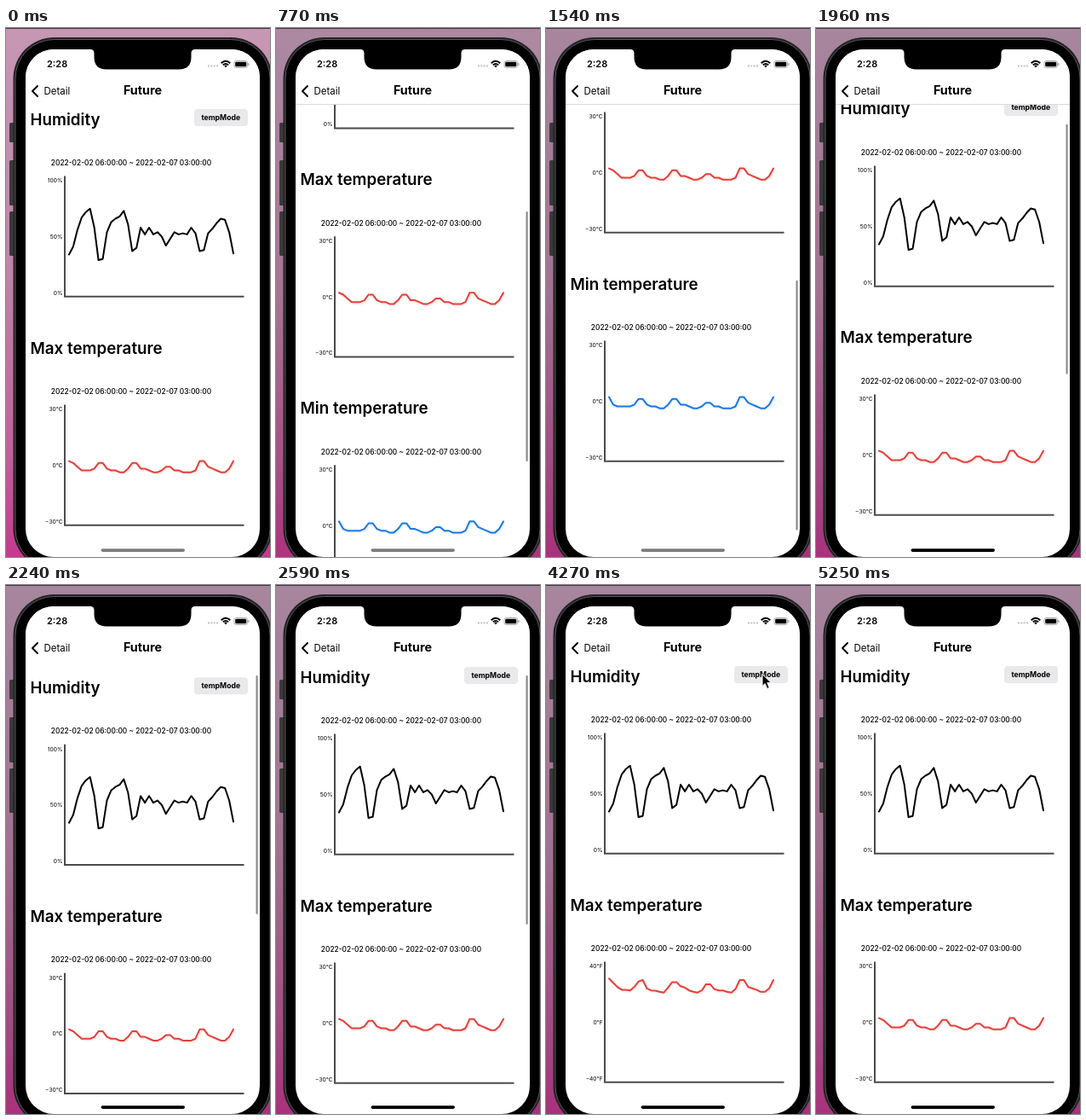
These frames come from a looping animation (310x620 px, 5.95 s). An HTML page:

```html
<!DOCTYPE html>
<html lang="en">
<head>
<meta charset="utf-8">
<title>Forecast charts</title>
<style>
  html, body { margin: 0; width: 100%; height: 100%; overflow: hidden; }
  svg { display: block; width: 310px; height: 620px; font-family: Inter, "Open Sans", sans-serif; }
  .title { font-size: 18.8px; font-weight: 600; }
  .dates { font-size: 8.4px; font-weight: 500; text-anchor: middle; }
  .label { font-size: 6.7px; text-anchor: end; }
  .axis { fill: none; stroke: #4b4b4d; stroke-width: 2; }
  .line { fill: none; stroke-width: 2; stroke-linejoin: round; stroke-linecap: round; }
</style>
</head>
<body>
<svg viewBox="0 0 310 620">
  <defs>
    <linearGradient id="dusk" x2="0" y2="1">
      <stop stop-color="#a7869e"/><stop offset=".5" stop-color="#a0728f"/>
      <stop offset=".85" stop-color="#a04a80"/><stop offset="1" stop-color="#a8327c"/>
    </linearGradient>
    <linearGradient id="dawn" x2="0" y2="1">
      <stop stop-color="#c797b4"/><stop offset=".45" stop-color="#bd86a6"/>
      <stop offset=".8" stop-color="#c0629a"/><stop offset="1" stop-color="#c43a8e"/>
    </linearGradient>
    <clipPath id="screen"><rect x="23" y="25" width="275" height="595" rx="33"/></clipPath>
  </defs>

  <rect width="310" height="620" fill="url(#dusk)"/>
  <rect id="glow" width="310" height="620" fill="url(#dawn)"/>
  <rect width="310" height="1" fill="#41363f"/>

  <g fill="#3a383b">
    <rect x="4" y="111" width="6" height="23" rx="1.5"/>
    <rect x="4" y="155" width="6" height="53" rx="1.5"/>
    <rect x="4" y="215" width="6" height="52" rx="1.5"/>
  </g>
  <rect x="8.5" y="11" width="304" height="624" rx="48" fill="#232325"/>
  <rect x="11" y="13.5" width="299" height="619" rx="45.5" stroke="#59595b"/>

  <g clip-path="url(#screen)">
    <rect x="23" y="25" width="275" height="595" fill="#fff"/>
    <g id="content"></g>
    <rect id="thumb" x="293.5" width="2.2" rx="1.1" fill="#8c8c8c"/>
    <rect x="23" y="25" width="275" height="64" fill="#fff"/>
    <rect id="hairline" x="23" y="89" width="275" height="1" fill="#d9d9d9"/>
    <path d="M37 68L31 74L37 80" fill="none" stroke="#000" stroke-width="1.9" stroke-linecap="round" stroke-linejoin="round"/>
    <text x="44.5" y="78" font-size="11.5">Detail</text>
    <text x="160.5" y="78" font-size="14.4" font-weight="700" text-anchor="middle">Future</text>
    <text x="48" y="46.3" font-size="11" font-weight="600">2:28</text>
    <path d="M237 44.5h12" stroke="#c3c3c5" stroke-width="2" stroke-dasharray="2 1.3"/>
    <g fill="none" stroke="#000" stroke-width="1.9">
      <path d="M252.7 41.3Q258 36.2 263.3 41.3M254.8 43.4Q258 40.4 261.2 43.4"/>
      <path d="M256.2 44.3Q258 42.9 259.8 44.3L258 46.4Z" fill="#000" stroke="none"/>
    </g>
    <rect x="268" y="38.5" width="15.5" height="8" rx="2.2" fill="none" stroke="#9a9a9a" stroke-width=".8"/>
    <rect x="269.2" y="39.7" width="13.1" height="5.6" rx="1.2"/>
    <rect x="284.3" y="41" width="1.2" height="3" rx=".6" fill="#9a9a9a"/>
    <rect id="home" x="111.5" y="610.3" width="98.5" height="3.6" rx="1.8"/>
  </g>
  <path d="M99 24H222V25Q217.500 25 217.500 29.500V34Q217.500 48.500 203 48.500H118Q103.500 48.500 103.500 34V29.500Q103.500 25 99 25Z"/>
  <path id="cursor" d="M254 104.500V118.500L257.200 115.500L259.700 121.500L262.300 120.400L259.800 114.600H264.300Z" stroke="#fff"/>
</svg>

<script>
const LOOP = 5950, STEP = 70, SCROLL_END = 343;
const $ = id => document.getElementById(id);

const humidity = [34,41,56,67,72,75,58,29,30,54,63,66,68,73,61,37,40,58,52,58,
  52,54,50,42,48,54,52,53,52,58,53,37,38,53,57,62,66,65,54,35];
const maxC = [2,1,-1,-3,-3,-3,-2,1,1,-2,-3,-3,-4,-4,-2,1,1,-2,-2,-3,
  -4,-4,-3,-1,-1,-3,-3,-4,-4,-4,-3,2,2,-1,-2,-3,-4,-4,-2,2];
const maxF = [31,28,25,23,23,22.5,25,29,30,24,22.5,22.3,21.5,21,24.5,28.5,28.5,25.5,24.5,22.5,
  21.5,21,22.5,27,27,23.5,22.5,22.5,21.5,21,23.5,30,30,25,24,23,21.5,21.5,24,30];
const minC = [2, -2, -3, ...maxC.slice(3)];

// Vertical positions are relative to the centre of a section title.
const plot = (values, zero, scale) =>
  values.map((v, i) => `${(74 + i * 193 / 39).toFixed(1)},${(zero - v * scale).toFixed(1)}`).join(' ');
const celsius = values => plot(values, 137, 2.18);
const fahrenheit = values => plot(values, 137, 1.635);

function section(index, title, labels, points, color, shadow) {
  const ticks = labels.map((s, i) =>
    `<text class="label" x="66.6" y="${74.4 + 65.6 * i}">${s}</text>`).join('');
  return `<g transform="translate(0 ${107 + 268 * index})">
    <text class="title" x="28.5" y="6.5">${title}</text>
    <text class="dates" x="147" y="54">2022-02-02 06:00:00 ~ 2022-02-07 03:00:00</text>
    ${ticks}
    <path class="axis" d="M69 66.5V207.8H279.500"/>
    <polyline class="line" id="line${index}" points="${points}" stroke="${color}"
      style="filter: drop-shadow(1.5px 1.5px 1px ${shadow})"/>
  </g>`;
}

const degrees = ['30°C', '0°C', '−30°C'];
$('content').innerHTML =
  section(0, 'Humidity', ['100%', '50%', '0%'], plot(humidity, 203, 1.31), '#000', 'transparent') +
  section(1, 'Max temperature', degrees, celsius(maxC), '#e5403a', '#f5b5b080') +
  section(2, 'Min temperature', degrees, celsius(minC), '#1a78e6', '#a5d5f580') +
  `<rect x="221" y="95" width="63" height="20" rx="4" fill="#e9e9eb"/>
   <text x="252.3" y="108" font-size="8.7" font-weight="700" text-anchor="middle">tempMode</text>`;
const tempLabels = [...document.querySelectorAll('.label')].slice(3);

// Decelerates towards an edge, then overshoots and springs back to it.
function swipe(t, start, edge, end, bend, from, to) {
  if (t >= end) return to;
  const s = (t - start) / (edge - start);
  if (s < 1) return from + (to - from) * s * (1 + bend * (1 - s));
  const speed = (to - from) * (1 - bend) / (edge - start);
  return to + speed * (t - edge) * Math.exp(-0.0097 * (t - edge));
}

function scrollAt(t) {
  if (t < 490) return 0;
  if (t < 1680) return swipe(t, 480, 1040, 1540, .23, 0, SCROLL_END);
  return swipe(t, 1670, 1978, 2730, .425, SCROLL_END, 0);
}

const clamp = (v, lo, hi) => Math.min(hi, Math.max(lo, v));
const between = (t, a, b) => t >= a && t < b;
const show = (id, on) => $(id).setAttribute('visibility', on ? 'visible' : 'hidden');

function draw(t) {
  const scroll = scrollAt(t);
  $('content').setAttribute('transform', `translate(0 ${-scroll})`);
  show('hairline', scroll > 0.5);

  const inside = clamp(scroll, 0, SCROLL_END), over = scroll - inside;
  $('thumb').setAttribute('y', 106 + inside * .553 + Math.max(0, over));
  $('thumb').setAttribute('height', 293 - Math.abs(over));
  $('thumb').setAttribute('opacity', t < 490 ? 0 : clamp((4270 - t) / 210, 0, 1));

  $('glow').setAttribute('opacity', 1 - .6 * clamp(t / 350, 0, 1) - .4 * clamp((t - 420) / 630, 0, 1));
  $('home').setAttribute('fill', t < 1680 ? '#7d7d7d' : '#000');

  const unit = between(t, 3010, 4690) ? ['40°F', '0°F', '−40°F'] : degrees;
  tempLabels.forEach((el, i) => el.textContent = unit[i % 3]);
  const inF = between(t, 3640, 5250);
  $('line1').setAttribute('points', inF ? fahrenheit(maxF) : celsius(maxC));
  show('cursor', between(t, 3430, 4760));
}

function tick() {
  const t = performance.now() % LOOP;
  draw(Math.floor(t / STEP) * STEP);
  requestAnimationFrame(tick);
}
tick();
</script>
</body>
</html>
```
